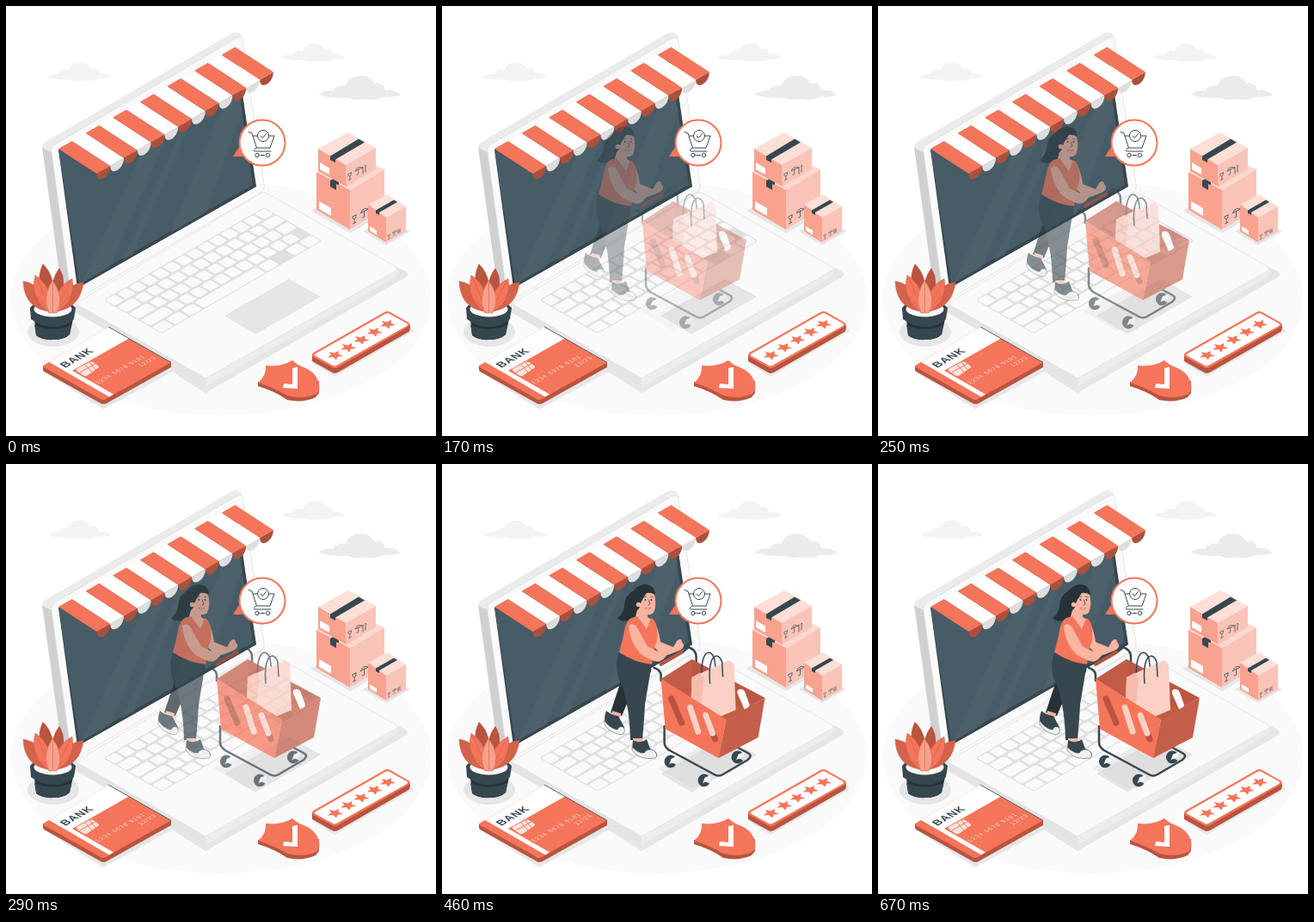
Write an HTML page that moves like this. It is 500x500 px and loops after 710 ms.

```html
<!DOCTYPE html>
<html lang="en">
<head>
<meta charset="utf-8">
<title>Online shopping</title>
<style>
html, body { margin: 0; width: 100%; height: 100%; overflow: hidden; background: #fff; }
svg { display: block; width: 100vw; height: 100vh; }
.or { fill: #f4755a } .dk { fill: #37474f } .ink { fill: #263238 } .skin { fill: #f9b5a0 }
.deep { fill: #b8543f } .sh { fill: #e6e6e6 } .wh { fill: #fff }
.ln { fill: none; stroke: #37474f; stroke-width: 1; stroke-linecap: round; stroke-linejoin: round }
.fine { stroke-width: .75 } .bag { stroke-width: 1.5 } .tube { stroke-width: 2.500 }
.sole { fill: #f0f0f0; stroke: #37474f; stroke-width: .5 }
text { font-family: Arial, "Liberation Sans", sans-serif }
</style>
</head>
<body>
<svg viewBox="0 0 500 500">
<defs>
  <clipPath id="glass"><path d="M61 167L267 50L291 210L83 328Z"/></clipPath>
  <g id="caster">
    <path d="M6 -3.500A7.300 7.300 0 1 0 6.500 4.500L0 1.500Z" class="dk"/>
    <path d="M-1.500 4L1 -2.500L8 -5L7.500 .5Z" fill="#f5f5f5"/>
  </g>
  <g id="marks" class="ln fine">
    <path d="M0 -4L4 -6L3.500 -2.500Q2 0 .5 -1.500ZM2 -.5V3M.5 4L3.500 2.300"/>
    <path d="M9 -8Q12 -15 17 -12.500ZM13 -10.500V-4Q12.500 -2.500 11 -3"/>
  </g>
  <path id="cloud" d="M0 17Q4 13 13 13.500Q16 8 24 9Q28 0 38 0Q47 0 50 7Q58 5 60 13Q70 12 74 17.500Q68 20 59 19Q52 23 43 21Q32 23 26 20Q12 21 0 17Z"/>
</defs>

<ellipse cx="250" cy="340" rx="244" ry="136" fill="#fafafa"/>
<use href="#cloud" x="48" y="65.500" fill="#f3f3f3"/>
<use href="#cloud" x="320.500" y="43" fill="#f3f3f3"/>
<use href="#cloud" transform="translate(363.500 81) scale(1.290 1.290)" fill="#ebebeb"/>

<!-- laptop -->
<path class="sh" d="M42 424L113 469L196 424L150 400Z"/>
<path class="sh" d="M83 356L232 450L464 316Q470 312 464 308L440 297Z"/>
<path fill="#e4e4e4" d="M80 346V356L232 443V431Z"/>
<path fill="#ededed" d="M232 431V443L453 315Q456 312 456 305Z"/>
<path fill="#fafafa" stroke="#e0e0e0" stroke-width=".8" d="M81 346L296 218Q300 215 304 218L453 303Q457 306 453 308L232 433Z"/>
<path fill="#d0d0d0" d="M42 164L54 164L78 342L74 342Q66 338 65 331Z"/>
<path fill="#ebebeb" d="M42 165Q42 161 46 158L262 32Q267 29 272 32Q275 34 275 39L60 166L53 170Z"/>
<path fill="#fafafa" stroke="#e0e0e0" stroke-width=".8" d="M53 170Q52 164 57 161L267 38Q274 34 275 41L300 208Q301 214 296 217L81 342Q77 344 76 339Z"/>
<path class="dk" d="M61 167L267 50L291 210L83 328Z"/>
<g clip-path="url(#glass)">
  <path fill="#475c66" d="M61 167L264 50L287 208L85 322Z"/>
  <path fill="#4c616a" d="M88 322L160 165L188 150L121 303ZM135 296L205 140L215 135L148 288ZM190 266L255 110L285 95L232 241Z"/>
  <path fill="none" stroke="#37474f" stroke-width="3" d="M265 50L289 209L83 327"/>
</g>
<g id="keys" transform="matrix(13.360 -7.710 13.600 7.800 113 342)"><rect width="14" height="5" rx=".25" fill="#e0e0e0"/></g>
<path fill="#e6e6e6" stroke="#dcdcdc" stroke-width=".7" d="M255 360L329 318L365 338L290 381Z"/>
<g id="awning"></g>

<!-- card, sliding out of the laptop's side -->
<path class="deep" d="M43 418V423Q43 425 46 426L110 462Q113 464 117 462L192 420V414L113 452Z"/>
<path class="or" d="M45 417L119 373L192 414.500L116 457Q113 459 110 457L44 420Q42 419 45 417Z"/>
<path class="wh" d="M50 414L119 373L143 386.500L77 424L125 451.500L120 454.500Z"/>
<path d="M119 373L192 414.500" stroke="#37474f" stroke-width=".8"/>
<text class="dk" transform="matrix(.866 -.5 .866 .5 69 421)" font-size="12.500" font-weight="700" letter-spacing=".8">BANK</text>
<path fill="#fbe3dc" d="M82 422L97 414Q99 413 101 414L107 418Q109 420 107 421L94 430Q91 431 89 429L82 424Z"/>
<path d="M86 426L104 416M92 417L100 426M97 414L104 423" stroke="#f4755a" fill="none"/>
<g fill="#fbd6cc" font-size="7">
  <text transform="matrix(.866 -.5 .866 .5 107 440)" letter-spacing="1">1234 5678 9101</text>
  <text transform="matrix(.866 -.5 .866 .5 157 420)" letter-spacing=".8">12/23</text>
</g>

<!-- boxes -->
<path class="sh" d="M354 238L400 264L447 237L400 212Z"/>
<path fill="#fcd9cf" d="M361 193L400 172L440 190L400 214Z"/>
<path fill="#f8a28f" d="M361 193L400 214V260L361 237Z"/>
<path fill="#f9c4b8" d="M400 214L440 190V235L400 260Z"/>
<path class="dk" d="M377 203L382 200L387 203V208L384 207V214L377 210Z"/>
<path class="wh" d="M364 227L378 235V244L364 236Z"/>
<use href="#marks" transform="translate(403 249) scale(1.050)"/>
<path fill="#fcdfd7" d="M363 166L398 147L430 165L395 185Z"/>
<path fill="#f8a28f" d="M363 166L395 185L396 210L363 192Z"/>
<path fill="#f9c4b8" d="M395 185L430 165V190L396 210Z"/>
<path class="dk" d="M377 174.500L410 154.500L417 158.500L383 178.500V182L377 179Z"/>
<path class="wh" d="M365 182L376 188.500V196L365 190Z"/>
<use href="#marks" transform="translate(398 199) scale(.9)"/>
<path class="ln fine" d="M415 195V187L414 189M418 193V185L419 186"/>
<path class="sh" d="M415 262L442 278L470 262L442 247Z"/>
<path fill="#fcdfd7" d="M421 231L443 219L465 233L442 246Z"/>
<path fill="#f8a28f" d="M421 231L442 246V275L421 262Z"/>
<path fill="#f9c4b8" d="M442 246L465 233V262L442 275Z"/>
<path class="dk" d="M430 237.500L451 225.500L455 228L434 240V243L430 241Z"/>
<path class="wh" d="M423 256L431 261V266L423 261Z"/>
<use href="#marks" transform="translate(444 269) scale(.6)"/>
<path class="ln fine" d="M456 264V260M458 263V259"/>

<!-- plant -->
<ellipse class="sh" cx="55" cy="379" rx="30" ry="17"/>
<path class="ink" d="M33 364L35 383Q42 389 55 388Q68 388 74 382L78 364Z"/>
<path class="dk" d="M28 351L29 364Q40 373 55 373Q70 373 79 364L81 351Q74 342 54 342Q34 342 28 351Z"/>
<path class="dk" d="M33 371Q54 380 76 371L74 382Q66 388 55 388Q42 388 35 382Z"/>
<ellipse cx="54.500" cy="352.500" rx="22" ry="9" fill="#fafafa"/>
<g stroke="#c25c46" stroke-width=".5">
  <path fill="#b8543f" d="M52 350Q31 324 43 300Q59 315 56 350ZM53 350Q50 320 62 305Q73 321 60 350Z"/>
  <path fill="#d4634c" d="M48 355Q21 350 20 320Q46 325 52 353ZM60 355Q87 350 90 321Q66 325 57 353Z"/>
  <path class="or" d="M50 356Q27 340 34 313Q54 326 54 355ZM58 356Q81 344 77 317Q58 326 55 355Z"/>
  <path fill="none" d="M50 353Q32 336 22 322M58 353Q77 336 88 323M53 354Q43 335 36 316M57 354Q68 335 75 320M53 340L44 304M55 340L62 309"/>
  <path fill="#f9a08a" d="M50 357Q41 339 54 319Q69 339 59 357Z"/>
  <path fill="none" d="M54.500 356V322"/>
</g>

<!-- shield -->
<path class="deep" d="M293 437V442Q313 448 327 458Q345 462 360 455L364 450V436L345 440Z"/>
<path class="or" d="M302 418Q320 420 333 412Q338 417 346 420Q359 425 363 436Q367 446 361 451Q345 458 327 453Q312 444 293 438Q303 430 302 418Z"/>
<path class="wh" d="M333 421L339 420V445L322 444L323 439L333 440Z"/>

<!-- rating -->
<path class="sh" d="M356 415L382 431L474 378L464 366Z"/>
<path class="deep" d="M356 406V413L379 426Q382 428 386 426L468 379Q470 378 470 371L440 380Z"/>
<path class="or" d="M357.500 403L440 356Q443 354 447 356L468 368Q471 370 468 373L386 420Q382 422 379 420L357 408Q355 405 357.500 403Z"/>
<path class="wh" d="M359.500 404.500L441 358Q444 356.500 446 358L466 369Q468 370.500 466 372L385 417.500Q382 419 380 418L360 407Q358 406 359.500 404.500Z"/>
<g id="stars" class="or"></g>

<!-- shopper and cart -->
<g id="show" opacity="0">
  <g id="cartBack">
    <path d="M250 354L317 319L362 340L290 378Z" fill="#d5d5d5" opacity=".4"/>
    <path class="ln tube" d="M278 219L285 213Q294 216 294 224V240"/>
  </g>
  <g id="woman">
    <path class="skin" d="M243 183Q250 186 253 207L268 213L272 206Q277 201 278 207L280 210Q281 214 275 217L262 222Q248 219 242 208Z"/>
    <path class="ink" d="M238 229Q246 237 239 247Q224 262 213 281L208 293L195 289Q202 267 210 244Z"/>
    <path class="skin" d="M197 287L207 290L206 296L196 293Z"/>
    <path class="dk" d="M190 287Q196 292 204 293L211 306Q212 311 206 313Q195 311 190 304Q186 297 190 287Z"/>
    <path class="sole" d="M188 298Q193 307 203 309Q205 304 210 306Q214 312 207 315Q193 312 188 303Z"/>
    <path class="dk" d="M207 215Q199 229 204 248Q217 274 218 321L232 321Q234 298 235 280Q240 250 243 231Z"/>
    <path class="skin" d="M221 319L232 319L233 325L221 324Z"/>
    <path class="dk" d="M221 321Q230 326 237 320L241 331Q249 334 249 339Q246 343 237 342Q226 338 220 332Z"/>
    <path class="sole" d="M220 329Q228 337 234 336Q238 330 245 333Q251 338 247 342Q228 345 220 333Z"/>
    <path class="ink" d="M222 147Q211 153 211 166Q210 174 203 179Q207 184 215 182Q226 184 231 171Z"/>
    <path class="skin" d="M227 166L238 170L238 178L243 181L238 196L223 181Z"/>
    <path class="or" d="M219 179L226 177L237 192L242 179Q249 182 249 194Q251 204 246 213L243 233Q223 231 205 219Q209 205 211 194Q213 182 219 179Z"/>
    <path class="skin" d="M216 188Q222 183 227 192L238 212L250 218Q251 214 256 212L254 217L261 216Q266 218 259 224Q253 232 246 229Q231 224 226 216Q217 204 216 188Z"/>
    <path class="skin" d="M228 151Q241 144 246 152Q249 164 245 173Q239 178 232 172Q226 163 228 151Z"/>
    <path class="ink" d="M218 159Q219 143 234 140Q246 140 247 152Q241 149 237 150Q231 158 229 165Q228 171 222 171Q217 166 218 159Z"/>
    <circle class="skin" cx="227.500" cy="163.500" r="2.700"/>
    <path class="ln fine" d="M233.500 155L236.500 154M241.500 154L244 155M239.500 158L241 163L239 164"/>
    <circle class="ink" cx="235.500" cy="158" r=".9"/><circle class="ink" cx="242.500" cy="158" r=".9"/>
    <path d="M235 167Q239 170 242 167Q240 171 237 170Z" fill="#fff" stroke="#b8543f" stroke-width=".6"/>
    <path d="M227 192L238 212L250 218" fill="none" stroke="#e28f79" stroke-width=".6"/>
  </g>
  <g id="cart">
    <path class="ln tube" d="M253 252V245Q252 239 245 237M257 305V324Q257 329 263 333L315 361Q320 364 325 361L354 344Q360 339 354 336L339 328"/>
    <path d="M253 233L277 219" stroke="#b8543f" stroke-width="4" stroke-linecap="round"/>
    <use href="#caster" x="264" y="345"/><use href="#caster" x="303" y="367"/><use href="#caster" x="342" y="340"/>
    <path fill="#c25c46" d="M253 250L289 227L374 272L329 298Z"/>
    <path fill="#a94e3a" d="M289 227L374 272L345 282L291 255Z" opacity=".3"/>
    <path class="wh" d="M344 262Q349 261 351 266L356 280Q355 285 350 285L342 267Q341 263 344 262Z"/>
    <path class="ln bag" d="M301 250Q299 229 305 221Q311 216 315 226L317 241"/>
    <path fill="#fbd0c5" d="M289 248L333 228L338 233L340 286L314 297L288 276Z"/>
    <path fill="#f7bbac" d="M289 248L298 243L303 249L299 287L288 278Z"/>
    <path class="ln bag" d="M310 255Q308 233 314 225Q320 220 324 230L325 247"/>
    <path class="or" d="M253 250L329 297L320 342L258 308Z"/>
    <path fill="#c45f49" d="M329 297L374 272L366 318L320 342Z"/>
    <g stroke-width="7" stroke-linecap="round">
      <path stroke="#b8543f" d="M265 273L277 301M305 292L316 320"/>
      <path stroke="#fbd0c5" d="M287 283L296 311M305 292L313 313"/>
    </g>
  </g>
</g>

<!-- bubble -->
<path class="or" d="M264 175L273 161L283 175Z"/>
<circle cx="298" cy="159" r="26.500" fill="#fff" stroke="#f4755a" stroke-width="2"/>
<g class="ln">
  <path d="M282 146.500L286 148L291.500 165H307L312 151H306M287.500 151H292M291 165Q286 168 290 169H308"/>
  <circle cx="299" cy="151" r="6.500"/><path d="M296 151L298.500 153.500L302.500 148.500"/>
  <circle cx="292" cy="173.500" r="2.200"/><circle cx="304.500" cy="173.500" r="2.200"/><path d="M296 173.500H300.500"/>
</g>
</svg>
<script>
const NS = 'http://www.w3.org/2000/svg';
const $ = id => document.getElementById(id);
function add(parent, tag, attrs) {
  const el = document.createElementNS(NS, tag);
  for (const k in attrs) el.setAttribute(k, attrs[k]);
  parent.appendChild(el);
}

// Awning: slanted stripes, each with a scallop
for (let i = 0; i < 13; i++) {
  const sx = 15.8, sy = -9.1, odd = i % 2;
  const x = 61 + i * sx, y = 166 + i * sy, fx = x + 44.5, fy = y + 29;
  add($('awning'), 'path', {
    d: `M${fx} ${fy}c0 13 ${sx} ${sy + 13} ${sx} ${sy}z`, fill: odd ? '#dedede' : '#ac503c'
  });
  add($('awning'), 'path', {
    d: `M${x} ${y}l${sx} ${sy}l44.5 29l${-sx} ${-sy}z`, fill: odd ? '#fff' : '#f4755a'
  });
}

// Keyboard: wide lead key, then unit keys filling the row
const leads = [[], [1.5], [1.75], [2.25], [1.2, 1.3, 1.2, 5.5, 1.2, 1.2, 1.2]];
leads.forEach((lead, row) => {
  for (let x = 0, i = 0; x < 13.9; i++) {
    let w = Math.min(lead[i] || 1, 14 - x);
    if (14 - x - w < 0.6) w = 14 - x;
    const grey = row === 4 && i === 5 || row === 3 && x + w > 13.9;
    if (!grey) add($('keys'), 'rect', {
      x: x + 0.09, y: row + 0.09, width: w - 0.18, height: 0.82, rx: 0.12, fill: '#fafafa'
    });
    x += w;
  }
});

for (let i = 0; i < 5; i++) {
  const pts = [];
  for (let j = 0; j < 10; j++) {
    const a = j * Math.PI / 5 - Math.PI / 2, r = j % 2 ? 3.7 : 8;
    pts.push(Math.cos(a) * r + ',' + Math.sin(a) * r);
  }
  add($('stars'), 'polygon', {
    points: pts.join(' '),
    transform: `matrix(.866 -.5 .866 .5 ${382.5 + i * 15.3} ${406 - i * 9})`
  });
}

const LOOP = 710, STEP = 1000 / 24;
const cartX = [[2, -28], [4, -20], [6, -12], [7, -8], [9, -2], [11, 1.6], [13, 1], [14, 0]];
const womanX = [[2, -31], [4, -23], [6, -15], [7, -11], [9, -4], [11, 1], [13, 2], [14, 2], [16, 0]];

function at(keys, k) {
  if (k <= keys[0][0]) return keys[0][1];
  for (let i = 1; i < keys.length; i++) {
    const [a, va] = keys[i - 1], [b, vb] = keys[i];
    if (k <= b) return va + (vb - va) * (k - a) / (b - a);
  }
  return keys[keys.length - 1][1];
}

function draw(t) {
  const k = Math.floor((t % LOOP + 3.4) / STEP);
  const move = (id, x) => $(id).setAttribute('transform', `translate(${x} 0)`);
  $('show').setAttribute('opacity', k < 2 ? 0 : Math.min(1, (k - 0.5) / 9));
  move('cart', at(cartX, k));
  move('cartBack', at(cartX, k));
  move('woman', at(womanX, k));
}

const start = performance.now();
function tick() {
  draw(performance.now() - start);
  requestAnimationFrame(tick);
}
tick();
</script>
</body>
</html>
```
